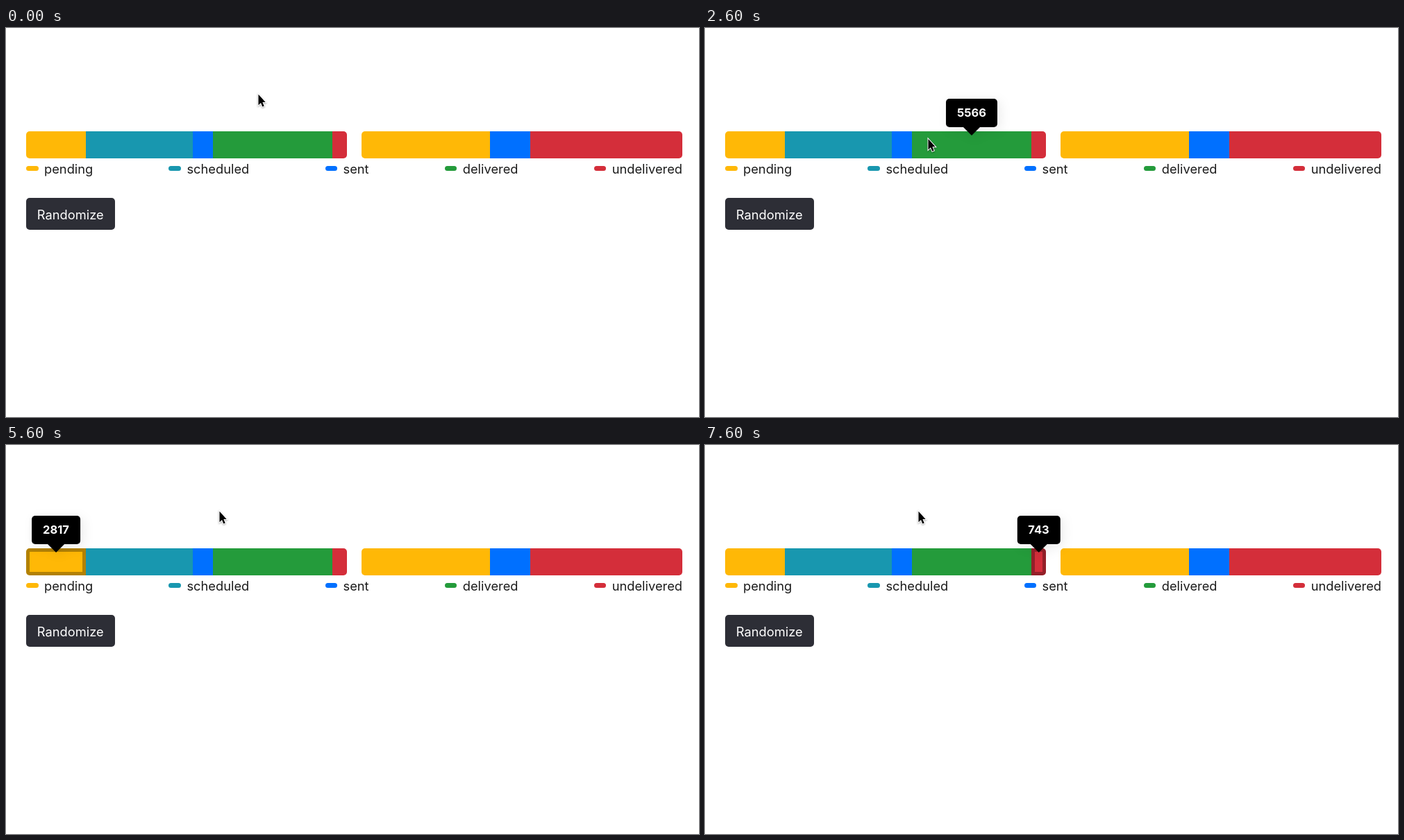
An HTML page for the animation above (8 s loop, 998x561 px).

```html
<!DOCTYPE html>
<html lang="en">
<head>
<meta charset="utf-8">
<title>Segmented bars</title>
<style>
  html, body { margin: 0; width: 100%; height: 100%; overflow: hidden; background: #fff; }
  body { position: relative; font: 18.3px/24px Inter, "Open Sans", sans-serif; color: #1b1b1b; }
  body > * { position: absolute; }
  .bar { top: 149px; width: 462px; height: 39px; display: flex; border-radius: 5px; overflow: hidden; }
  .focus { box-shadow: inset 0 0 0 5px rgba(0, 0, 0, .3); }
  #legend { left: 29px; top: 191px; width: 945px; display: flex; justify-content: space-between; }
  #legend span { display: flex; align-items: center; }
  #legend i { width: 17.5px; height: 7px; margin: 0 8.5px 1px 0; border-radius: 4px; }
  #button { left: 29px; top: 245px; width: 127.5px; height: 46px; line-height: 48px;
    border-radius: 5px; background: #2d2e36; color: #fff; text-align: center; }
  #tip { top: 102px; height: 41px; padding: 0 16px; border-radius: 5px; background: #000; color: #fff;
    font-size: 16.5px; font-weight: 700; line-height: 41px; transform: translateX(-50%);
    filter: drop-shadow(4px 4px 8px rgba(0, 0, 0, .08)); }
  #tip::after { content: ""; position: absolute; top: 100%; left: 50%; margin-left: -12px;
    border: 12px solid transparent; border-top-color: #000; border-bottom: 0; }
  #cursor { left: 0; top: 0; overflow: visible; filter: drop-shadow(.5px 1px 1px rgba(0, 0, 0, .35)); }
</style>
</head>
<body>
<div class="bar" id="first" style="left: 29px"></div>
<div class="bar" id="second" style="left: 512px"></div>
<div id="legend"></div>
<div id="button">Randomize</div>
<div id="tip"></div>
<svg id="cursor" width="12" height="20">
  <path d="M0 0V15.5L3.5 12.2L5.8 17.8L8.2 16.8L5.9 11.3H10.2Z"
    stroke="#fff" stroke-width="2" paint-order="stroke"/>
</svg>
<script>
const LOOP = 8000, STEP = 200;
const HOVER_END = 5000, FOCUS_START = 5400, FOCUS_PERIOD = 530;
const $ = id => document.getElementById(id);

function add(parent, tag, style) {
  const el = parent.appendChild(document.createElement(tag));
  Object.assign(el.style, style);
  return el;
}

const states = [
  { name: 'pending', color: '#ffb806', value: 2817, width: 86, other: 185 },
  { name: 'scheduled', color: '#1897af', value: 5032, width: 154, other: 0 },
  { name: 'sent', color: '#0070ff', value: 985, width: 29, other: 58 },
  { name: 'delivered', color: '#249b3b', value: 5566, width: 172, other: 0 },
  { name: 'undelivered', color: '#d42e3a', value: 743, width: 21, other: 219 }
];

let edge = 29;
for (const s of states) {
  s.left = edge;
  edge += s.width;
  s.el = add($('first'), 'div', { width: s.width + 'px', background: s.color });
  add($('second'), 'div', { width: s.other + 'px', background: s.color });
  const item = add($('legend'), 'span');
  add(item, 'i', { background: s.color });
  item.append(s.name);
}

// Each stroke of the pointer slows down towards its end.
const home = [363.5, 95.7];
const strokes = [
  { from: 0, to: 1200, end: [212, 172] },
  { from: 1400, to: 1800, end: [273, 159.5] },
  { from: 1800, to: 2600, end: [321.5, 160] },
  { from: 2600, to: 3200, end: [365.5, 161] },
  { from: 3800, to: 4400, end: [281, 70] },
  { from: 4400, to: 4800, end: [307.5, 95.7] }
];

function pointer(t) {
  return strokes.reduce((pos, { from, to, end }) => {
    const k = Math.min(1, Math.max(0, (t - from) / (to - from)));
    const eased = 1 - (1 - k) ** 2;
    return pos.map((p, i) => p + (end[i] - p) * eased);
  }, home);
}

// The tooltip lags one step behind the pointer and stays after it leaves.
function hovered(t) {
  for (let s = t - STEP; s >= 0; s -= STEP) {
    const [x, y] = pointer(s);
    if (y > 149) return states.find(({ left, width }) => x < left + width);
  }
}

function draw(now) {
  const t = Math.floor(now % LOOP / STEP) * STEP;
  const [x, y] = pointer(t);
  $('cursor').style.transform = `translate(${x}px, ${y}px)`;

  const focused = states[Math.floor((t - FOCUS_START) / FOCUS_PERIOD)];
  for (const s of states) s.el.classList.toggle('focus', s === focused);

  const shown = t < HOVER_END ? hovered(t) : focused;
  $('tip').hidden = !shown;
  if (shown) {
    $('tip').textContent = shown.value;
    $('tip').style.left = shown.left + shown.width / 2 + 'px';
  }
}

const start = performance.now();
function tick() {
  draw(performance.now() - start);
  requestAnimationFrame(tick);
}
tick();
</script>
</body>
</html>
```
